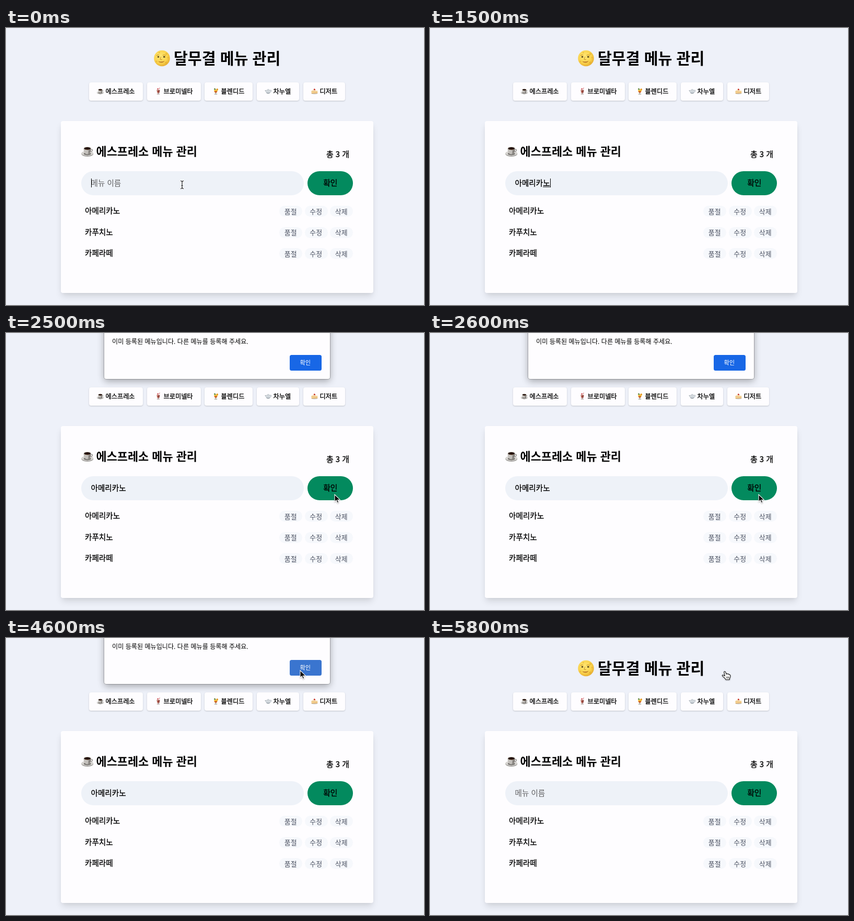
Animation of 800 by 530 pixels, one loop 5900 ms. Source, as an HTML page:

```html
<!DOCTYPE html>
<html lang="ko">
<head>
<meta charset="utf-8">
<title>메뉴 관리</title>
<style>
  html, body { margin: 0; width: 100%; height: 100%; overflow: hidden; background: #eef1f9; }
  #stage { position: absolute; left: 0; top: 0; width: 800px; height: 530px; overflow: hidden; }
  #stage div, svg { position: absolute; }
  svg { left: 0; top: 0; overflow: hidden; }
  text { font-family: "Noto Sans CJK KR", "Noto Sans CJK", sans-serif; white-space: pre; }
  .tab { background: #fefdff; border-radius: 4px; box-shadow: 0 1px 3px rgba(0,0,0,.13), 0 1px 2px rgba(0,0,0,.07); }
  .card { background: #fefdff; border-radius: 4px; box-shadow: 0 8px 14px -2px rgba(0,0,0,.12), 0 3px 6px -2px rgba(0,0,0,.06); }
  .field { background: #eef2f8; border-radius: 23px; }
  .ok { background: #038a5e; border-radius: 23px; }
  .pill { background: #f6f8fc; border-radius: 11px; }
  #dialog { left: 0; top: 0; width: 800px; height: 130px; }
  .sheet { background: #fefdff; border-radius: 4px; box-shadow: 0 0 0 1px rgba(0,0,0,.22), 0 4px 14px rgba(0,0,0,.32); }
  #blue { border-radius: 3.5px; }
</style>
</head>
<body>
<div id="stage">
  <svg id="page" width="800" height="530"></svg>
  <div id="dialog">
    <svg id="message" width="800" height="130"></svg>
  </div>
  <svg id="pointer" width="800" height="530"></svg>
</div>
<script>
const LOOP = 5900;
const $ = id => document.getElementById(id);
const stage = $('stage'), page = $('page'), dialog = $('dialog'), message = $('message');

function box(cls, x, y, w, h, parent = stage, before = page) {
  const d = document.createElement('div');
  d.className = cls;
  d.style.cssText = `left:${x}px;top:${y}px;width:${w}px;height:${h}px`;
  parent.insertBefore(d, before);
  return d;
}

const label = (s, x, y, size, weight = 400, fill = '#000', extra = '') =>
  `<text x="${x}" y="${y}" font-size="${size}" font-weight="${weight}" fill="${fill}" ${extra}>${s}</text>`;
// Thin outline that gives regular text a medium weight
const firm = 'stroke="#000" stroke-width=".3"';

// Icons live in a 24 x 24 box
const icons = {
  coffee: `
    <ellipse cx="12" cy="17.2" rx="11.8" ry="5.2" fill="#8d8b88"/>
    <ellipse cx="12" cy="16.3" rx="11.8" ry="4.900" fill="#d6d4d1"/>
    <ellipse cx="12" cy="17" rx="7" ry="2.800" fill="#716e6b"/>
    <path d="M18 8.500q4.500-.8 4 1.800q-.6 2.300-5 2.700" fill="none" stroke="#8d8a87" stroke-width="1.400"/>
    <path d="M4.500 6.500q0 11.500 7.500 11.500t7.500-11.500z" fill="#c3c0bc"/>
    <path d="M13 8q5 0 6.300-1q-.5 10-6.800 10.800q3-4 .5-9.800z" fill="#86827e"/>
    <ellipse cx="12" cy="6.500" rx="7.500" ry="3.500" fill="#e6e3df"/>
    <ellipse cx="12" cy="6.800" rx="6.500" ry="2.700" fill="#23120c"/>
    <path d="M7 8q5 2 10 0" fill="none" stroke="#65402a" stroke-width=".8"/>`,
  shake: `
    <path d="M12 9L15.500 1L18 .6" fill="none" stroke="#c83a40" stroke-width="1.500"/>
    <path d="M6.500 8h11l-2 10h-7z" fill="#8c3a32"/>
    <path d="M8 8h3l1 10h-2.500z" fill="#c87566"/>
    <path d="M6 8.500q0-5 6-5t6 5z" fill="#e9d5d0"/>
    <circle cx="10" cy="4" r="2" fill="#c21f2b"/>
    <path d="M10.500 18h3l.5 3h3v2H7v-2h3z" fill="#a99693"/>`,
  tropical: `
    <path d="M12 8L8 1" stroke="#b93c30" stroke-width="1.500"/>
    <path d="M5 5q3-5 7 0l-2 2z" fill="#3f8a35"/>
    <circle cx="17" cy="6" r="3.500" fill="#e39a28"/>
    <path d="M6 7h12q1 6-3 9.500q-3 2-6 0Q5 13 6 7z" fill="#ecb932"/>
    <path d="M7 12h10q-.5 3-2.500 4.500q-2.500 1.500-5 0Q7.500 15 7 12z" fill="#c9532a"/>
    <path d="M11 17h2v4h4v2H7v-2h4z" fill="#8f8e7e"/>`,
  teapot: `
    <path d="M7 18L.5 9l3-1 5.500 4z" fill="#a9b1b8"/>
    <path d="M18 9q6-2 5.500 2q-1 4-6 5" fill="none" stroke="#949da6" stroke-width="1.800"/>
    <ellipse cx="12.500" cy="13" rx="8.500" ry="6.300" fill="#d3d9de"/>
    <path d="M5 16q7.500 4 15 0q-2 4.500-7.500 4.500T5 16z" fill="#77828c"/>
    <ellipse cx="12.500" cy="8" rx="5.500" ry="1.800" fill="#edf0f2" stroke="#8b959e" stroke-width=".7"/>
    <circle cx="12.500" cy="5.500" r="1.500" fill="#9fa8b0"/>`,
  cake: `
    <ellipse cx="12" cy="19.500" rx="11.500" ry="3" fill="#c9c5c1"/>
    <path d="M1 11L22.500 13v6L1.500 20z" fill="#e3a648"/>
    <path d="M1 14.500L22.500 15.500v1.700L1.500 17z" fill="#fff0d2"/>
    <path d="M1 11L10 4.500l12.500 5v4L1 12.500z" fill="#f6dfb4"/>
    <path d="M9 6.500q0-4 2.800-3.800T15 7.500q-3 2.500-6-1z" fill="#c9352f"/>
    <path d="M15.500 8.500q2-3 4.500 0v2.500h-4.500z" fill="#fff5e2"/>`,
  moon: `
    <circle cx="12" cy="12" r="11.800" fill="url(#glow)"/>
    <g fill="#dba52a" opacity=".45">
      <circle cx="18.500" cy="5.500" r="1.600"/><circle cx="21" cy="11" r="1.100"/>
      <circle cx="4" cy="16.500" r="1.300"/><circle cx="18" cy="18.500" r="1.600"/><circle cx="8" cy="3.600" r="1.100"/>
    </g>
    <path d="M4 8q1.800-1.500 4-.4M13 7.600q2.300-1.200 4.500.4" fill="none" stroke="#b98922" stroke-width=".8"/>
    <ellipse cx="6.600" cy="9.900" rx="1.300" ry="1" fill="#3a2c10"/>
    <ellipse cx="15.300" cy="9.900" rx="1.400" ry="1" fill="#3a2c10"/>
    <path d="M10.500 9.500q-.5 2.500-1.300 3.800q1.200 1.200 3 .3" fill="none" stroke="#c4922a" stroke-width=".8"/>
    <path d="M6.500 16q4.500 2 9.500-.3q-1.500 2.800-4.800 2.800T6.500 16z" fill="#bd7e2e"/>`
};
const icon = (name, x, y, size) =>
  `<g transform="translate(${x} ${y}) scale(${size / 24})">${icons[name]}</g>`;

let art = `<defs><radialGradient id="glow" cx=".42" cy=".38" r=".65">
  <stop offset="0" stop-color="#ffe777"/><stop offset=".65" stop-color="#fad34c"/><stop offset="1" stop-color="#e5ab31"/>
  </radialGradient></defs>`;

art += icon('moon', 283, 42.500, 31) + label('달무결 메뉴 관리', 321, 69, 29.2, 700);

const tabs = [
  ['coffee', '에스프레소', 159, 103], ['shake', '브로미넬타', 270, 103],
  ['tropical', '블렌디드', 380, 92], ['teapot', '차누엘', 480, 81], ['cake', '디저트', 569, 80]
];
for (const [pic, name, x, w] of tabs) {
  box('tab', x, 104, w, 35);
  art += icon(pic, x + 15, 114.5, 13) + label(name, x + 31.500, 125.500, 12.2, 400, '#000', firm);
}

box('card', 105, 178, 597.5, 329);
box('field', 144, 274, 425.5, 46);
box('ok', 577, 274, 87, 46);
art += icon('coffee', 144, 224, 23.5);
art += label('에스프레소 메뉴 관리', 172.5, 243.5, 21.9, 700);
art += label('총 3 개', 613, 246.7, 14.9, 400, '#000', firm);
art += label('확인', 607.2, 302.3, 14.7, 400, '#000', firm);

['아메리카노', '카푸치노', '카페라떼'].forEach((name, i) => {
  const y = 340 + i * 40.5;
  art += label(name, 151, y + 15, 14.6, 400, '#000', firm);
  ['품절', '수정', '삭제'].forEach((word, k) => {
    const x = 523 + k * 48.5;
    box('pill', x, y, 44, 21);
    art += label(word, x + 21.700, y + 15.5, 12.9, 400, '#4a5060', 'text-anchor="middle"');
  });
});

art += label('', 162.5, 302, 14.6, 400, '#000', 'id="entry"');
art += '<rect id="under" y="303.500" height="1" width="13.5"/><rect id="caret" y="288" width="1" height="17"/>';
page.innerHTML = art;

box('sheet', 188, -40, 432, 127.5, dialog, message);
const blue = box('', 543, 41.5, 61, 30.5, dialog, message);
blue.id = 'blue';
message.innerHTML =
  label('이미 등록된 메뉴입니다. 다른 메뉴를 등록해 주세요.', 203, 21, 12.1) +
  label('확인', 562.500, 60.5, 11.2, 500, '#fff');

$('pointer').innerHTML = `
  <g id="beam" fill="none">
    <path d="M-3-7.500q3 0 3 2.500q0-2.500 3-2.500M0-5V5M-3 7.500q3 0 3-2.500q0 2.500 3 2.500M-1.500 1.500h3" stroke="#fff" stroke-width="2.600" opacity=".7"/>
    <path d="M-3-7.500q3 0 3 2.500q0-2.500 3-2.500M0-5V5M-3 7.500q3 0 3-2.500q0 2.500 3 2.500M-1.500 1.500h3" stroke="#111" stroke-width="1.100"/>
  </g>
  <path id="arrow" d="M0 0V14L3.200 11L5.400 16.300L7.800 15.300L5.600 10.200H10.300Z" fill="#000" stroke="#fff" stroke-width="1.100"
    style="filter:drop-shadow(0 1px 1px rgba(0,0,0,.3))"/>
  <g id="hand" stroke="#111" stroke-width="1.100" stroke-linejoin="round" stroke-linecap="round"
    style="filter:drop-shadow(0 1px 1px rgba(0,0,0,.25))">
    <path fill="#fff" d="M-1.200 1.500Q-1.300-.3 .3 0Q1.500.4 2 2L3.200 5.400Q3.500 4 4.700 4.200Q6 4.400 6.200 5.500Q6.800 4.600 7.900 5.100Q8.900 5.500 9 6.500Q10.800 6 10.900 8Q11.200 11 9.600 13L9.300 15.800H2.200Q1.500 13.500-1 11.600Q-4.200 9.200-4.800 7.600Q-4.200 6-2.200 7.200L.4 8.800Z"/>
    <path fill="none" stroke-width=".8" d="M3.800 10.200v3M5.900 10.200v3M7.900 10.200v3"/>
  </g>`;

// Each key press leaves this text in the field
const typed = ['ㅇ', '아', '암', '아메', '아멜', '아메리', '아메\uB9C4', '아메리카', '아메리칸', '아메리카노'];
const TYPE_START = 300, KEY = 125, OPEN = 2500, CLOSE = 4650, GONE = 4850;

// time, x, y
const path = [
  [0, 337, 300], [1650, 337, 300], [1800, 470, 309], [2000, 622, 321], [2250, 629, 309],
  [2950, 629, 309], [3450, 561, 74], [3600, 561, 74], [3850, 563, 62], [4900, 563, 62], [5050, 564, 64], [LOOP, 564, 64]
];
const clamp = v => Math.max(0, Math.min(1, v));
const ease = v => v * v * (3 - 2 * v);

function pointerAt(t) {
  const i = Math.max(1, path.findIndex(p => p[0] > t));
  const [t0, x0, y0] = path[i - 1], [t1, x1, y1] = path[i];
  const k = ease((t - t0) / (t1 - t0));
  return [x0 + (x1 - x0) * k, y0 + (y1 - y0) * k];
}

function kindAt(t, x) {
  if (t < TYPE_START) return 'beam';
  if (t < 1650) return '';
  if (t < 2350) return x < 574 ? 'beam' : 'hand';
  return t < 4950 ? 'arrow' : 'hand';
}

const show = (el, on) => el.style.visibility = on ? 'visible' : 'hidden';

function draw(t) {
  const n = Math.min(typed.length, Math.floor((t - TYPE_START) / KEY) + 1);
  const filled = n > 0 && t < CLOSE;
  const value = filled ? typed[n - 1] : '';
  const entry = $('entry');
  const ink = filled ? '#000' : '#6c6c6e';
  entry.textContent = filled ? value : '메뉴 이름';
  entry.setAttribute('fill', ink);
  entry.setAttribute('stroke', ink);
  entry.setAttribute('stroke-width', filled ? .3 : .1);

  const focused = t < 2320;
  const end = 162.5 + value.length * 13.43;
  $('under').setAttribute('x', end - 13.5);
  show($('under'), filled && focused);
  $('caret').setAttribute('x', Math.round(end));
  show($('caret'), focused);

  dialog.style.opacity = t < OPEN ? 0 : clamp((GONE - t) / (GONE - CLOSE));
  const [x, y] = pointerAt(t);
  const hover = clamp((t - 3680) / 150);
  const mix = (a, b) => Math.round(a + (b - a) * hover);
  blue.style.background = `rgb(${mix(24, 58)},${mix(103, 117)},${mix(230, 207)})`;

  const kind = kindAt(t, x);
  for (const id of ['beam', 'arrow', 'hand']) {
    const el = $(id);
    show(el, id === kind);
    el.setAttribute('transform', `translate(${x} ${y})`);
  }
}

const start = performance.now();
function tick() {
  draw((performance.now() - start) % LOOP);
  requestAnimationFrame(tick);
}
tick();
</script>
</body>
</html>
```
